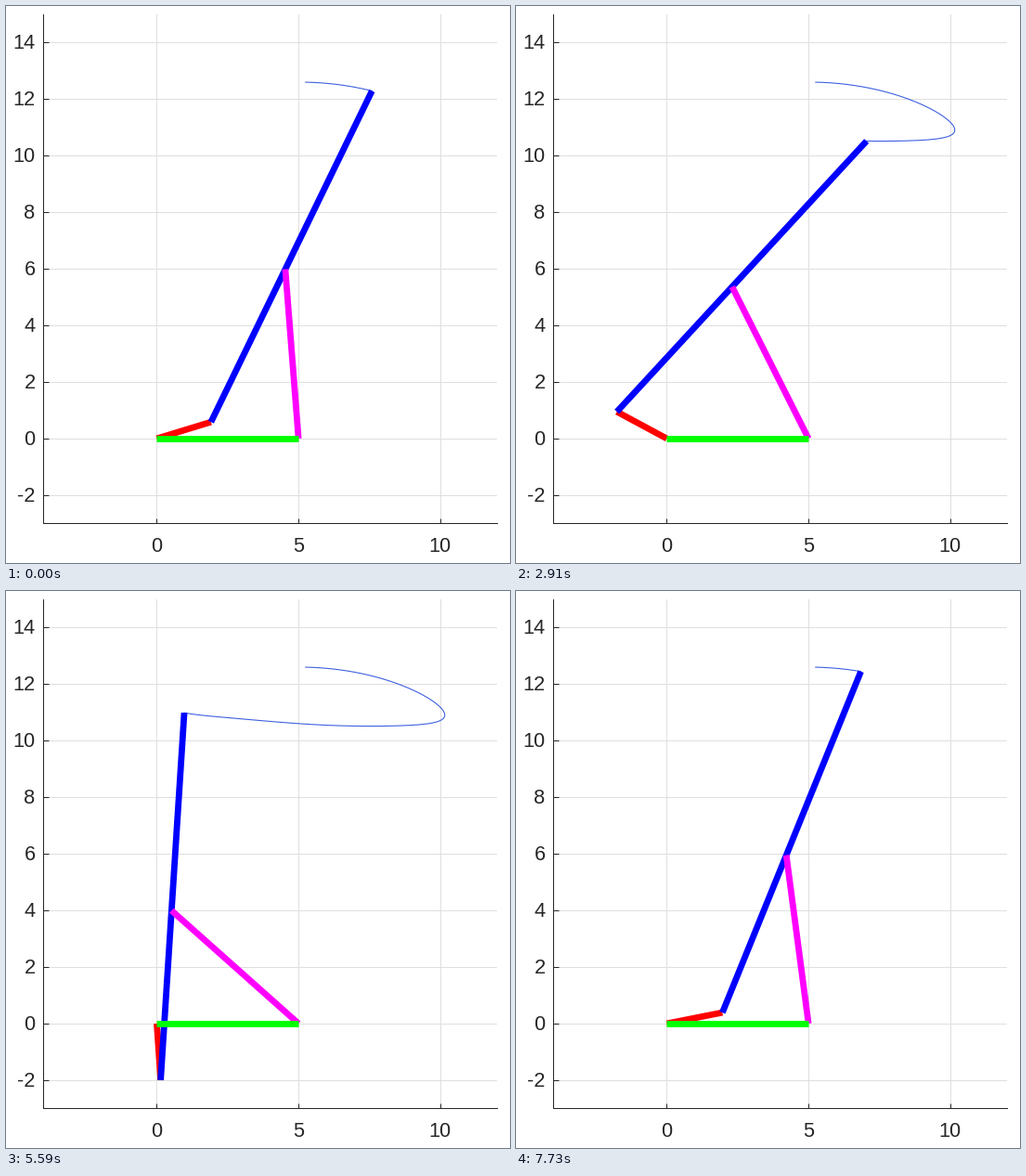
A matplotlib script for the animation above (7.81 s loop, 543 px wide and 600 px high).

```python
import numpy as np
import matplotlib.pyplot as plt
from matplotlib.animation import FuncAnimation

W, H, DPI = 543, 600, 100
PX = 72 / DPI                      # one pixel in points
FRAMES, STEP = 142, 55             # 7810 ms per turn
LEFT, RIGHT, TOP, BOTTOM = 40.3, 528.9, 8.5, 557.45
UNIT = (BOTTOM - TOP) / 18         # pixels per data unit
INK = "#262626"

# Four-bar linkage
CRANK, GROUND, ROCKER, COUPLER, ARM = 2, 5, 6, 6, 13


def crank_angle(i):
    """A slightly quicker start, then a steady turn; the last pose holds."""
    return np.interp(i, [0, 17, 140], [17, 64.4, 371.2]) % 360


def linkage(deg):
    """Crank pin, rocker joint and arm tip for a crank angle."""
    t = np.radians(deg)
    a = np.array([CRANK * np.cos(t), CRANK * np.sin(t)])
    dx, dy = GROUND - a[0], -a[1]
    d = np.hypot(dx, dy)
    along = (COUPLER**2 - ROCKER**2 + d**2) / (2 * d)
    h = np.sqrt(COUPLER**2 - along**2)
    b = a + np.array([along * dx - h * dy, along * dy + h * dx]) / d
    return a, b, a + (b - a) * ARM / COUPLER


fig = plt.figure(figsize=(W / DPI, H / DPI), dpi=DPI, facecolor="white")
ax = fig.add_axes([LEFT / W, 1 - BOTTOM / H, (RIGHT - LEFT) / W, (BOTTOM - TOP) / H])
ax.set(xlim=(-4, 12), ylim=(-3, 15), xticks=range(0, 11, 5), yticks=range(-2, 15, 2))
ax.set_axisbelow(True)
ax.grid(color="#dfdfdf", lw=PX)
ax.tick_params(direction="in", length=5.5 * PX, width=PX, color=INK,
               labelleft=False, labelbottom=False)
for side, spine in ax.spines.items():
    spine.set(visible=side in ("left", "bottom"), color=INK, linewidth=PX)

font = dict(family="Liberation Sans", size=21.8 * PX, color=INK, va="baseline")
for x in range(0, 11, 5):
    ax.text(x, -3 - 30.5 / UNIT, str(x), ha="center", **font)
for y in range(-2, 15, 2):
    ax.text(-4 - 8.7 / UNIT, y - 7.3 / UNIT, str(y), ha="right", **font)


def bar(color, z):
    return ax.plot([], [], color=color, lw=6.8 * PX, solid_capstyle="butt", zorder=z)[0]


def link(line, p, q):
    line.set_data([p[0], q[0]], [p[1], q[1]])


trail, = ax.plot([], [], color="#3c5fe0", lw=1.1 * PX, zorder=2.5)
crank, arm, rocker, ground = (
    bar(color, z) for z, color in enumerate(["#ff0000", "#0000ff", "#ff00ff", "#00ff00"], 3))
link(ground, (0, 0), (GROUND, 0))


def draw(i):
    deg = crank_angle(i)
    a, b, tip = linkage(deg)
    link(crank, (0, 0), a)
    link(arm, a, tip)
    link(rocker, b, (GROUND, 0))
    trail.set_data(*linkage(np.linspace(0, deg, 160))[2])
    return trail, crank, arm, rocker


anim = FuncAnimation(fig, draw, frames=FRAMES, interval=STEP, repeat=True,
                     repeat_delay=0, blit=False)
plt.show()
```
